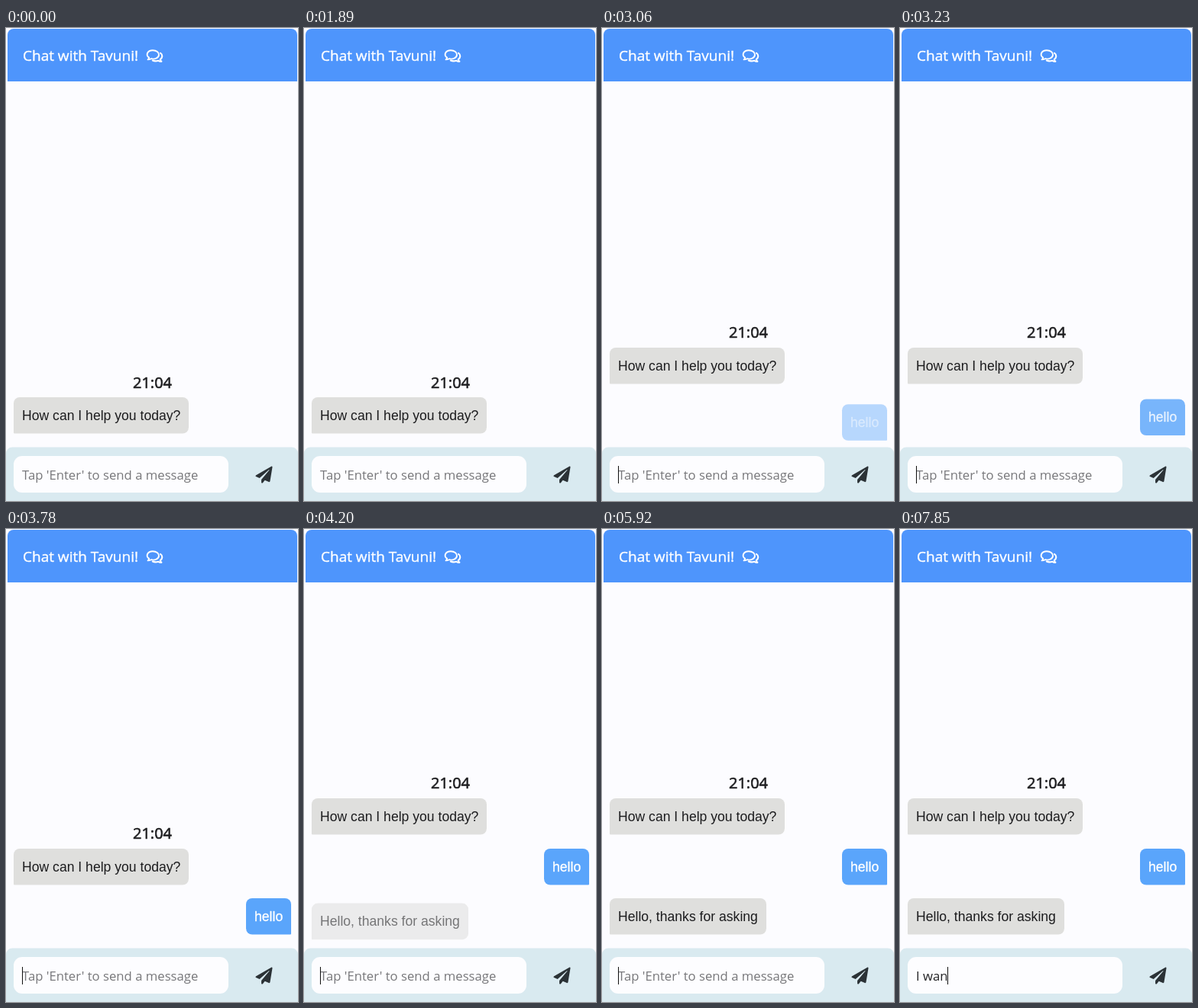
An HTML page with a canvas that plays this animation: 382 px wide and 620 px high, repeating every 8 s.

```html
<!DOCTYPE html>
<html lang="en">
<head>
<meta charset="utf-8">
<title>Chat</title>
<style>
html, body { margin: 0; width: 100%; height: 100%; overflow: hidden; background: #fcfcff; }
canvas { display: block; width: 382px; height: 620px; }
</style>
</head>
<body>
<canvas id="stage"></canvas>
<script>
const W = 382, H = 620, LOOP = 8000;
const UI = '"Open Sans", "Noto Sans", sans-serif';
const SANS = '"Liberation Sans", Arial, sans-serif';

const canvas = document.getElementById('stage');
const ctx = canvas.getContext('2d');
const dpr = window.devicePixelRatio || 1;
canvas.width = W * dpr;
canvas.height = H * dpr;
ctx.scale(dpr, dpr);

const BOT = { fill: '#dfdfdd', ink: '#1c1c1e', corners: [8, 8, 8, 1] };
const USER = { fill: '#5aa5fb', ink: '#fff', corners: [8, 8, 1, 8] };

const messages = [
  { at: -1000, text: 'How can I help you today?', x: 10, w: 229, look: BOT },
  { at: 2940, text: 'hello', x: 314, w: 59, look: USER },
  { at: 4030, text: 'Hello, thanks for asking', x: 10, w: 205, look: BOT }
];

// Input contents from each time on
const typing = [
  [0, ''], [2010, 'h'], [2350, 'he'], [2480, 'hel'], [2610, 'hell'], [2690, 'hello'],
  [2940, ''], [6970, 'I'], [7260, 'I '], [7470, 'I w'], [7720, 'I wa'], [7850, 'I wan']
];

// Times at which the caret flips, starting hidden
const blinks = [330, 840, 1380, 1890, 2010, 3290, 3780, 4300, 4830, 5330, 5920, 6420, 6920];

const plane = new Path2D('M476 3.2L12.5 270.6c-18.1 10.4-15.8 35.6 2.2 43.2L121 358.4l287.3-253.2' +
  'c5.5-4.9 13.3 2.6 8.6 8.3L176 407v80.5c0 23.6 28.5 32.9 42.5 15.8L282 426l124.6 52.2' +
  'c14.2 6 30.4-2.9 33-18.2l72-432C515 7.8 493.3-6.8 476 3.2z');
const frontBubble = new Path2D('M185.6 41.4C186.5 40.6 187 39.8 187.2 38.9C182.2 35.4 185 29.2 192 29.2' +
  'C197 29.2 200 31.9 200 35C200 39.1 194.6 41.5 189.8 40.2C188.5 41 187.2 41.4 185.6 41.4Z');
const backBubble = new Path2D('M202 32.9C205.2 34.9 205 38.9 201.8 41.2C202.1 42.4 202.6 43.2 203.4 43.9' +
  'C202 44 200.5 43.5 199.3 42.8C196.5 43.7 193.6 43.4 191.8 42.5');

function box(x, y, w, h, radii, fill) {
  ctx.fillStyle = fill;
  ctx.beginPath();
  ctx.roundRect(x, y, w, h, radii);
  ctx.fill();
}

// A thin stroke thickens the letters to a medium weight
function label(text, x, y, font, fill, { align = 'left', stroke = 0 } = {}) {
  ctx.font = font;
  ctx.textAlign = align;
  ctx.fillStyle = ctx.strokeStyle = fill;
  ctx.fillText(text, x, y);
  if (stroke) {
    ctx.lineWidth = stroke;
    ctx.strokeText(text, x, y);
  }
}

function drawHeader() {
  box(2, 1, 379, 69, [8, 8, 0, 0], '#4e95fc');
  label('Chat with Tavuni!', 22, 43, `19px ${UI}`, '#fff', { stroke: 0.4 });
  ctx.lineJoin = ctx.lineCap = 'round';
  ctx.lineWidth = 1.9;
  ctx.stroke(frontBubble);
  ctx.lineWidth = 2.1;
  ctx.stroke(backBubble);
}

function drawMessages(t) {
  const shown = messages.filter(m => t >= m.at);
  const last = shown.length - 1;
  label('21:04', 191.5, 472 - 66 * last, `20px ${UI}`, '#1e1e20', { align: 'center', stroke: 0.6 });
  shown.forEach(({ at, text, x, w, look }, i) => {
    const left = 1 - Math.min(1, (t - at) / 600);
    const y = Math.round(484 - 65.5 * (last - i)) + 18 * left ** 3;
    ctx.globalAlpha = 1 - left ** 2.5;
    box(x, y, w, 47.6, look.corners, look.fill);
    label(text, x + 11, Math.floor(y + 30), `17.6px ${SANS}`, look.ink, { stroke: look === USER ? 0.3 : 0 });
    ctx.globalAlpha = 1;
  });
}

function drawInput(t) {
  box(0, 549.6, W, 70.4, [8, 8, 0, 0], '#d9eaf0');
  box(10, 561, 281, 48, 11, '#fdfdff');

  const text = typing.filter(([at]) => t >= at).pop()[1];
  const font = `16.7px ${UI}`;
  label(text || "Tap 'Enter' to send a message", 21, 592, font, text ? '#222224' : '#77777a');

  const caretOn = blinks.filter(at => t >= at).length % 2 === 1;
  if (caretOn) {
    const x = 21 + (text ? Math.round(ctx.measureText(text).width) : 0);
    ctx.fillStyle = '#111';
    ctx.fillRect(x, 574, 1, 23);
  }

  ctx.save();
  ctx.translate(326.5, 574.5);
  ctx.scale(22 / 512, 22 / 512);
  ctx.fillStyle = '#2b3236';
  ctx.fill(plane);
  ctx.restore();
}

function draw(now) {
  const t = now % LOOP;
  ctx.fillStyle = '#fcfcff';
  ctx.fillRect(0, 0, W, H);
  drawHeader();
  drawMessages(t);
  drawInput(t);
}

const start = performance.now();
function tick() {
  draw(performance.now() - start);
  requestAnimationFrame(tick);
}
tick();
</script>
</body>
</html>
```
